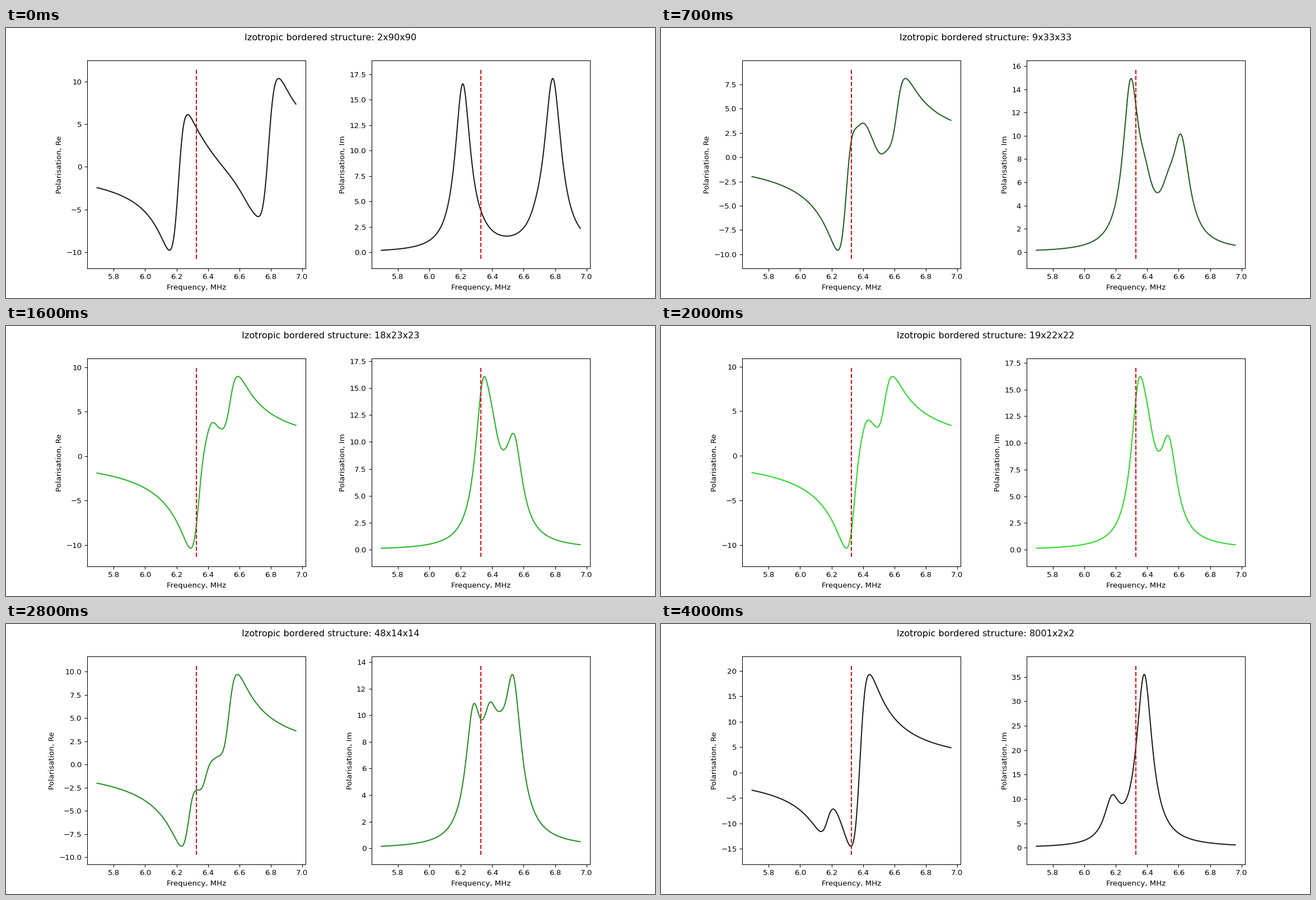
A matplotlib script that plays this animation: 1159 px wide and 483 px high, repeating every 4100 ms.

```python
import numpy as np
import matplotlib.pyplot as plt
from matplotlib.animation import FuncAnimation

F0 = 6.327        # resonance of a single cell, MHz
LOSS = 0.0192
CELLS = 8000
SPLIT = 20        # up to here layers are counted, then the width shrinks
FRAMES = 2 * SPLIT + 1
DPI = 1159 / 12

freq = np.linspace(0.9 * F0, 1.1 * F0, 400)


def shape(i):
    """Layers and width of the block, with a nearly constant cell count."""
    if i < SPLIT:
        layers = i + 1
        return layers, round((CELLS / layers) ** 0.5)
    width = FRAMES - i
    return round(CELLS / width ** 2), width


def modes(x):
    """Frequency and peak absorption of each mode for a log aspect ratio x."""
    rod, slab, bend = max(x, 0), max(-x, 0), abs(x)
    lower = (6.353 - 0.047 * slab + 0.0035 * slab ** 2 - 0.066 * rod ** 0.45,
             8.2 + 4.1 * np.exp(-2 * rod) + 0.9 * slab)
    inner = (6.405 - 0.015 * bend,
             6.1 * np.exp(-((x - 1.2) / 3.1) ** 2))
    side = (6.465 + 0.05 * slab - 0.011 * rod,
            5.5 * bend * np.exp(-bend / 1.3))
    upper = (6.537 + 0.0546 * slab ** 2 / (1 + 0.17 * slab ** 2) - 0.00193 * rod ** 2,
             8.1 + 0.094 * slab ** 3 + 1.75 * rod + 0.136 * rod ** 2)
    return lower, inner, side, upper


def polarisation(layers, width):
    return sum(
        height * LOSS / (1 - (f / freq) ** 2 - 1j * LOSS)
        for f, height in modes(np.log(layers / width))
    )


def line_color(i):
    t = 1 - abs(i - SPLIT) / SPLIT
    edge = 0.1 + 0.04 * t
    return edge, 0.1 + 0.75 * t, edge


# The tiny surplus keeps the pixel size from rounding down
fig, axes = plt.subplots(1, 2, figsize=(12 + 1e-6, 483 / DPI + 1e-6), dpi=DPI)
fig.subplots_adjust(left=0.125, right=0.9, bottom=0.11, top=0.88, wspace=0.3)
title = fig.suptitle("")


def draw(i):
    layers, width = shape(i)
    title.set_text(f"Izotropic bordered structure: {layers + 1}x{width + 1}x{width + 1}")
    p = polarisation(layers, width)
    for ax, part, values in zip(axes, ("Re", "Im"), (p.real, p.imag)):
        ax.clear()
        ax.plot(freq, values, color=line_color(i))
        ax.plot([F0, F0], ax.get_ylim(), "--", color=(0.84, 0.04, 0.07))
        ax.set_xlabel("Frequency, MHz")
        ax.set_ylabel(f"Polarisation, {part}")


anim = FuncAnimation(fig, draw, frames=FRAMES, interval=100, repeat=True)
plt.show()
```
